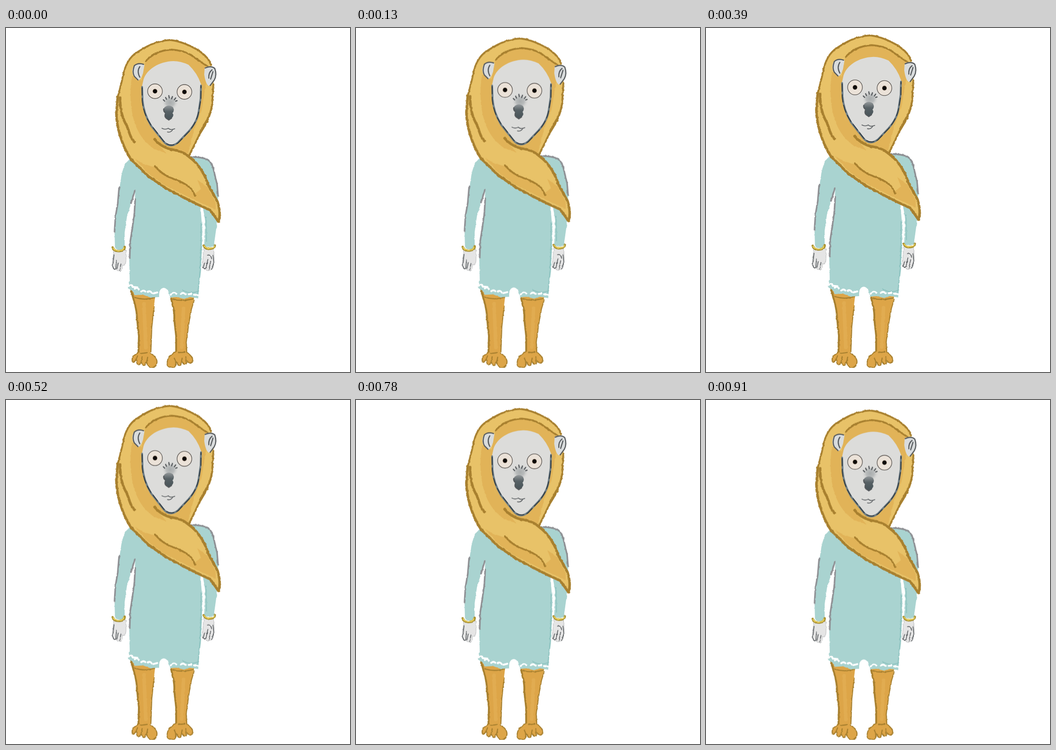
An HTML page without scripts for the animation above (1.04 s loop, 748 by 748 pixels).

```html
<!DOCTYPE html>
<html lang="en">
<head>
<meta charset="utf-8">
<title>Breathing figure in a scarf</title>
<style>
  html, body { margin: 0; width: 100%; height: 100%; overflow: hidden; background: #fff; }
  svg { display: block; width: 100vw; height: 100vh; }
  path { fill: none; stroke-linecap: round; stroke-linejoin: round; }

  /* The feet stay put while the body stretches upward in four hard steps. */
  .figure { transform-origin: 0 738px; animation: breathe 1040ms infinite; }
  @keyframes breathe {
    0%, 100% { transform: scaleY(1); animation-timing-function: steps(4, end); }
    50% { transform: scaleY(1.0187); animation-timing-function: steps(4, end); }
  }

  .skin { fill: #dda548; }
  .skin-light { stroke: #e4b158; stroke-width: 8; opacity: .6; }
  .brown { stroke: #a8802f; stroke-width: 4; }
  .thin { stroke-width: 2.4; }
  .thick { stroke-width: 5.5; }
  .dress { fill: #a9d3d0; }
  .teal { stroke: #8dc3c0; stroke-width: 2; }
  .shade { stroke: #8f9195; stroke-width: 3.5; }
  .lace { stroke: #fff; stroke-width: 4; }
  .hand { fill: #e5e5e5; stroke: #b9bbbc; stroke-width: 1; }
  .ink { stroke: #55595c; stroke-width: 1.6; }
  .bold { stroke-width: 2.4; }
  .bracelet { stroke: #a38a2b; stroke-width: 5; }
  .bracelet-light { stroke: #e6cc57; stroke-width: 2.6; }
  .scarf { fill: #e8c268; }
  .fold { fill: #e1b358; }
  .face { fill: #dcdcda; }
  .jaw { stroke: #6d7d85; stroke-width: 4; }
  .jaw-dark { stroke: #2d363b; stroke-width: 1.8; stroke-dasharray: 16 7; }
  .ear { fill: #d9dcdd; }
  .nose { fill: url(#snout); }
</style>
</head>
<body>
<svg viewBox="0 0 748 748">
  <defs>
    <filter id="rough" filterUnits="userSpaceOnUse" x="220" y="0" width="260" height="748" color-interpolation-filters="sRGB">
      <feTurbulence type="fractalNoise" baseFrequency=".16" numOctaves="2" seed="4"/>
      <feDisplacementMap in="SourceGraphic" scale="3" xChannelSelector="R" yChannelSelector="G"/>
    </filter>
    <linearGradient id="snout" x1="0" y1="0" x2="0" y2="1">
      <stop offset="0" stop-color="#94999b"/>
      <stop offset=".4" stop-color="#586266"/>
      <stop offset="1" stop-color="#465257"/>
    </linearGradient>
    <radialGradient id="fuzz">
      <stop offset="0" stop-color="#a9adae"/>
      <stop offset=".5" stop-color="#b9bcbc"/>
      <stop offset="1" stop-color="#dcdcda" stop-opacity="0"/>
    </radialGradient>
    <clipPath id="floor"><path d="M0-40H748V739H0Z"/></clipPath>
    <g id="eye">
      <circle r="16" fill="#ebe2d8" stroke="#55504c" stroke-width="1.3"/>
      <circle r="5" fill="#54412f"/>
      <circle r="4.2" fill="#0c0a09"/>
    </g>
  </defs>

  <g clip-path="url(#floor)">
  <g class="figure">
    <g filter="url(#rough)">
      <g id="legs">
        <path class="skin" d="M271 566C276 590 284 605 285 632L288 670 287 704 276 714Q272 724 277 726 282 725 284 722 284 734 290 732 294 730 294 725 296 736 302 733L306 726Q307 738 318 739 330 736 328 723 326 714 314 707L316 650 321 610 325 580Z"/>
        <path class="skin" d="M358 580C363 602 367 615 366 635L370 670 370 702 355 714Q349 724 351 734 358 741 367 737 370 731 371 726 374 736 380 733L383 725Q386 734 392 730L394 724Q400 732 405 726 408 718 400 711L393 704 392 682 398 640 404 606 411 580Z"/>
        <path class="skin-light" d="M300 600L304 695M386 610L382 694"/>
        <path class="brown" d="M272 570C277 592 284 606 285 632L289 670 288 704M359 588C363 606 367 616 366 635L370 670 370 702"/>
        <path class="brown thin" d="M322 606L317 650 315 704M409 592L403 612 398 640 392 682 393 704M287 706L276 714Q272 724 277 726 282 725 286 713M284 722Q284 734 290 732 294 730 296 715M294 725Q296 736 302 733 306 728 308 716M306 726Q307 738 318 739 330 736 328 723 326 714 314 707M292 708L307 706M370 703L355 714Q349 724 351 734 358 741 367 737 372 728 366 718M371 726Q374 736 380 733L383 718M383 725Q386 734 392 730L391 715M394 724Q400 732 405 726 408 718 400 711L393 705M375 706L389 705"/>
        <path class="brown thin" d="M280 586Q302 593 323 586M362 590Q384 595 407 589"/>
      </g>

      <g id="hands">
        <path class="hand" d="M234 484L232 504 231 520Q235 528 239 524 241 531 246 527 250 533 253 522L253 515Q261 520 261 504L261 484Z"/>
        <path class="hand" d="M430 479L428 505 427 520Q431 527 434 523 438 531 442 526 449 528 451 517L453 500 451 479Z"/>
        <path class="ink" d="M235 493L232 518Q235 528 239 523L240 506M241 525L244 511M247 527L250 513M432 510L429 521Q432 526 435 521L439 503M441 526L445 507M450 494L452 510 447 525M438 494Q446 492 447 502"/>
      </g>

      <g id="dress">
        <path class="dress" d="M270 285C258 291 253 310 250 327L245 360 239 405 236 443 237 479Q248 486 258 479L258 445 263 410 272 381 281 350 280 382 276 425 270 465 268 500 269 550 265 565 275 573 280 581 298 580 314 586 333 585Q332 566 343 565 354 566 356 586L371 585 387 589 400 585 418 588 420 560 424 530 426 480 427 440 423 390 428 389 433 420 431 473Q443 480 452 473L458 430 462 400 461 350C455 315 450 289 438 284L400 279 320 285Z"/>
        <path class="teal" d="M424 425L424 480 421 540 417 578M435 410L436 464M419 572Q400 580 384 570"/>
        <path class="shade" d="M246 346L243 382 238 410 236 443M280 354L272 381M281 372L279 405 274 440 270 465 269 500M403 280Q427 281 438 286 449 293 452 311L459 340 461 364"/>
        <path class="lace" d="M267 561q5-5 9 2l10 1M280 567q6-5 9 2M294 573q5-4 9 0M308 574q5-4 9 2M321 577l8-2M358 580q7-7 12-2M380 578q6-4 11 1M397 579l6-1M409 580l8 1"/>
        <path d="M334 584Q334 567 344 567 353 569 355 584Z" fill="#fff" style="fill:#fff"/>
        <path class="bracelet" d="M232 477Q234 486 247 485 258 484 258 476M430 473Q433 481 444 480 454 479 454 472"/>
        <path class="bracelet-light" d="M233 478Q236 485 247 484 256 483 257 477M431 474Q435 480 444 479 452 478 453 473"/>
      </g>

      <g id="scarf">
        <path class="scarf" d="M357 26C382 29 421 44 440 68L448 84 452 115 448 170C443 199 430 216 421 231L398 279C421 296 433 320 440 342L460 378Q469 404 462 422L444 396 413 382 350 350 309 322 272 286C250 253 240 211 240 185L243 150 252 115C258 83 265 69 279 57 305 39 327 28 357 26Z"/>
        <path class="fold" d="M303 76Q328 48 361 48 398 52 441 88L435 120 425 180 410 218 395 276 350 262 323 245C304 221 292 178 292 130L299 90Z"/>
        <path class="fold" d="M274 104C268 140 270 180 282 212 292 238 308 254 324 264L348 272 338 260 322 243 302 205 294 160 295 115Z"/>
        <path class="fold" d="M325 303L346 320 386 336 409 362 424 350 416 330 438 346 456 380 456 395 406 372 344 341 307 314 281 285 300 296Z"/>
        <path class="brown thick" d="M399 281C421 297 433 320 440 342L460 378Q468 404 462 421L444 396 413 382 350 350 309 322 272 286C250 253 240 211 240 185L243 150"/>
        <path class="brown" d="M446 80L440 68C421 44 382 29 357 26 327 28 305 39 279 57 265 69 258 83 252 115L243 150M451 122L448 168C443 199 430 216 421 231L399 276"/>
        <path class="brown thick" d="M248 151C248 180 254 199 263 213 269 230 271 239 279 248M323 242Q339 260 360 264 385 268 398 280"/>
        <path class="brown" d="M304 72Q325 49 359 47 391 49 408 63L439 84M323 300Q341 319 356 325 380 333 395 343 405 349 411 365M447 174Q442 193 434 205L421 228"/>
      </g>
    </g>

    <g id="head">
      <path class="face" d="M364 72C332 73 306 90 299 112L295 130 298 166Q302 197 325 224L345 249Q357 260 370 252 393 234 411 207 419 191 421 175L425 145 424 122Q416 98 397 80 380 72 364 72Z"/>
      <path class="jaw" d="M296 128L297 157Q299 185 315 212L342 246Q356 263 374 249L397 225Q416 204 419 181L423 154 424 125"/>
      <path class="jaw-dark" d="M296 130L296 157Q299 189 317 213L342 245Q356 261 374 250L397 226Q415 205 419 182L424 154 424 126"/>
      <path class="ear" d="M301 80Q291 75 280 80 272 88 276 102L288 114Q294 111 298 98ZM432 86Q445 80 452 86 459 97 452 116L441 126Q434 122 431 101Z"/>
      <path class="ink bold" d="M299 79Q287 75 279 82 274 96 279 105L287 113M291 84Q284 94 291 107M433 87Q446 81 454 88 459 102 453 113L444 125M448 91Q440 97 441 109M450 95L445 111"/>
    </g>

    <g id="features">
      <use href="#eye" x="324" y="137.5"/>
      <use href="#eye" x="388" y="139"/>
      <ellipse cx="357" cy="162" rx="18" ry="17" fill="url(#fuzz)"/>
      <path class="nose" d="M345 172Q354 165 363 172L365 177Q365 182 362 185 366 190 361 195L354 201 347 195Q343 190 346 185 342 182 342 177Z"/>
      <path class="ink bold" d="M347 188Q344 192 348 196L354 200 360 196M343 176Q342 181 346 184"/>
      <path class="ink bold" d="M342 156l3 3M347 151l2 4M354 147l1 5M362 149l-2 5M369 152l-3 4M372 158l-3 1"/>
      <path class="ink" d="M339 218Q346 222 353 218 357 223 367 219M351 226Q357 228 362 222"/>
    </g>
  </g>
  </g>
</svg>
</body>
</html>
```
